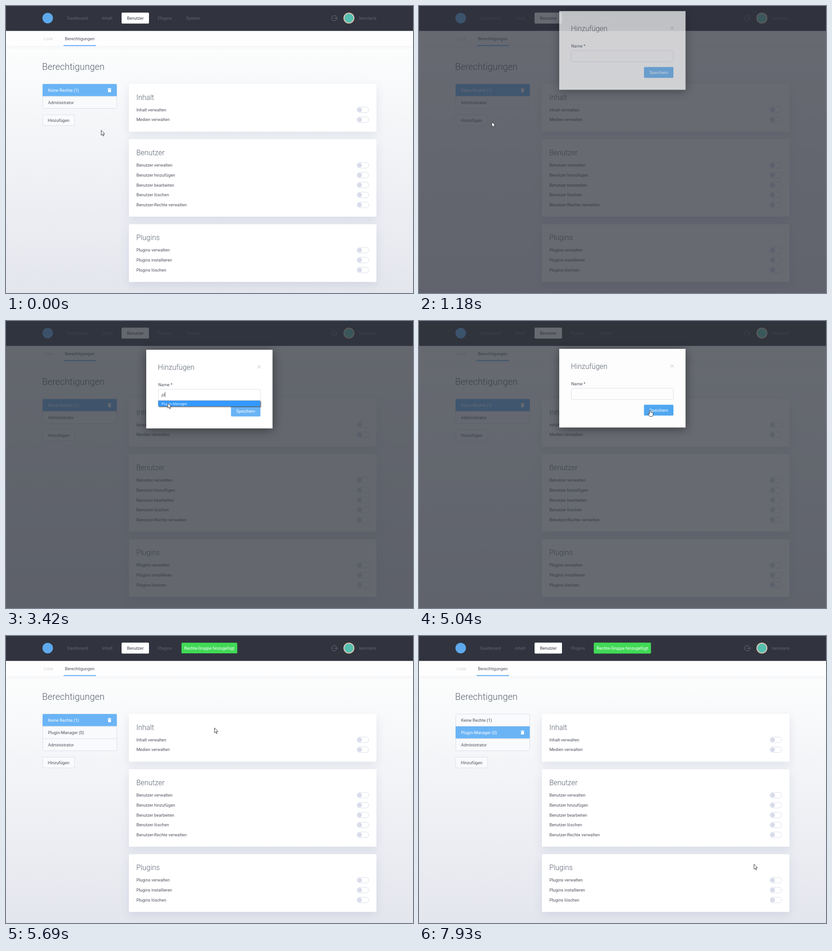
Animation, 891 px wide and 629 px high, one loop 7.99 s. Source, as an HTML page with a canvas:

```html
<!DOCTYPE html>
<html lang="de">
<head>
<meta charset="utf-8">
<title>Berechtigungen</title>
<style>
html, body { margin: 0; width: 100%; height: 100%; overflow: hidden; background: #fff; }
canvas { display: block; }
</style>
</head>
<body>
<canvas id="stage" width="891" height="629"></canvas>
<script>
const W = 891, H = 629, LOOP = 7990;
const screen2d = document.getElementById('stage').getContext('2d');
const layer = document.createElement('canvas');
layer.width = W;
layer.height = H;
const layer2d = layer.getContext('2d');
let ctx = screen2d;

const BLUE = '#6ab4f5', INK = '#50545f', HEAD = '#5c6472', LINE = '#dadeea';

const OPEN = 979, CLOSE = 5030, SLIDE = 490, FADE = 315;
const SAVED = 5450, SELECT = 6590;
const SUGGEST = 2940, TYPE_L = 3170, PICK = 3730;

const clamp = v => Math.max(0, Math.min(1, v));

// CSS "ease": cubic-bezier(.25, .1, .25, 1)
function ease(x) {
  if (x <= 0) return 0;
  if (x >= 1) return 1;
  let lo = 0, hi = 1, u = 0.5;
  for (let i = 0; i < 24; i++) {
    u = (lo + hi) / 2;
    const bx = 0.75 * u * (1 - u) + u * u * u;
    if (bx < x) lo = u; else hi = u;
  }
  return 0.3 * u * (1 - u) ** 2 + 3 * u * u * (1 - u) + u ** 3;
}

function box(x, y, w, h, r, fill, stroke) {
  ctx.beginPath();
  ctx.roundRect(x, y, w, h, r);
  if (fill) { ctx.fillStyle = fill; ctx.fill(); }
  if (stroke) { ctx.strokeStyle = stroke; ctx.lineWidth = 1; ctx.stroke(); }
}

function disc(x, y, r, fill) {
  ctx.beginPath();
  ctx.arc(x, y, r, 0, 7);
  ctx.fillStyle = fill;
  ctx.fill();
}

function path(points, stroke, width = 1) {
  ctx.beginPath();
  points.forEach(([x, y], i) => i ? ctx.lineTo(x, y) : ctx.moveTo(x, y));
  ctx.strokeStyle = stroke;
  ctx.lineWidth = width;
  ctx.stroke();
}

// y is the middle of the line
function text(str, x, y, color = INK, align = 'left') {
  ctx.font = '400 9.3px Roboto, sans-serif';
  ctx.fillStyle = color;
  ctx.textAlign = align;
  ctx.fillText(str, x, y + 3.4);
}

function heading(str, x, base, size) {
  ctx.font = `300 ${size}px Roboto, sans-serif`;
  ctx.fillStyle = HEAD;
  ctx.textAlign = 'left';
  ctx.fillText(str, x, base);
}

function shadow(color, blur, dy) {
  ctx.shadowColor = color;
  ctx.shadowBlur = blur;
  ctx.shadowOffsetY = dy;
}

function header() {
  ctx.fillStyle = '#31343e';
  ctx.fillRect(0, 0, W, 54.6);
  disc(91.3, 26.5, 11.5, '#5ea9ec');
  box(253, 14.5, 60, 24, 2, '#fff');
  const dim = '#62656f';
  text('Dashboard', 134, 26.5, dim);
  text('Inhalt', 210, 26.5, dim);
  text('Benutzer', 264.8, 26.5, '#3a3e49');
  text('Plugins', 332.6, 26.5, dim);
  text('System', 394.3, 26.5, dim);

  ctx.beginPath();
  ctx.arc(718.6, 26.8, 5.8, 0.6, Math.PI * 2 - 0.6);
  ctx.strokeStyle = '#747781';
  ctx.lineWidth = 1;
  ctx.stroke();
  path([[718, 26.8], [725.5, 26.8]], '#747781');
  path([[723.2, 24.5], [725.6, 26.8], [723.2, 29.1]], '#747781');

  disc(750.7, 26.5, 12, '#d9c5b2');
  disc(750.7, 26.5, 9.8, '#55bfb0');
  text('benolaris', 811, 26.5, dim, 'right');
}

function subnav() {
  shadow('rgba(70,80,130,.06)', 8, 2);
  ctx.fillStyle = '#fefefe';
  ctx.fillRect(0, 54.6, W, 33);
  shadow('transparent', 0, 0);
  text('Liste', 82.7, 71.5, '#cdd0d8');
  text('Berechtigungen', 129, 71.5, INK);
  ctx.fillStyle = '#5fadf3';
  ctx.fillRect(126, 85.7, 71, 2);
}

function trash(x, y) {
  ctx.fillStyle = '#fff';
  ctx.fillRect(x - 4, y - 3.6, 8, 1.3);
  ctx.fillRect(x - 1.5, y - 4.6, 3, 1.2);
  box(x - 3.2, y - 1.8, 6.4, 6.4, 0.8, '#fff');
}

function list(t) {
  const rows = ['Keine Rechte (1)', 'Administrator'];
  if (t >= SAVED) rows.splice(1, 0, 'Plugin-Manager (0)');
  const active = t >= SELECT ? 1 : 0;
  const h = rows.length * 27;
  box(80.5, 171, 162, h - 0.5, 2, '#f9fafc', LINE);
  rows.forEach((label, i) => {
    const y = 171 + i * 27;
    if (i > 0) path([[80.5, y], [242.5, y]], LINE);
    if (i === active) {
      box(80, y, 162.5, 26.8, i ? 0 : [2, 2, 0, 0], BLUE);
      trash(226.6, y + 13.3);
    }
    text(label, 92, y + 13.4, i === active ? '#fff' : INK);
  });
  const top = 184.5 + h;
  box(80.5, top, 69.5, 23.5, 2, '#f9fafc', LINE);
  text('Hinzufügen', 91.5, top + 12, INK);
}

function card(y, h, title, rows) {
  shadow('rgba(80,92,150,.13)', 20, 7);
  box(269, y, 542, h, 2, '#fff');
  shadow('transparent', 0, 0);
  heading(title, 285.2, y + 35, 15.95);
  rows.forEach((label, i) => {
    const cy = y + 56.8 + i * 21.7;
    text(label, 285.4, cy);
    box(768.5, cy - 6, 25.7, 12.4, 6.2, '#fff', LINE);
    disc(774.2, cy + 0.2, 5, '#d8dcea');
  });
}

function page(t) {
  const g = ctx.createLinearGradient(0, 88, 0, H);
  g.addColorStop(0, '#fcfdfd');
  g.addColorStop(1, '#e4e6ed');
  ctx.fillStyle = g;
  ctx.fillRect(0, 0, W, H);
  subnav();
  header();
  heading('Berechtigungen', 79, 139.6, 19.93);
  list(t);
  card(170.5, 105, 'Inhalt', ['Inhalt verwalten', 'Medien verwalten']);
  card(292, 169.7, 'Benutzer', ['Benutzer verwalten', 'Benutzer hinzufügen',
    'Benutzer bearbeiten', 'Benutzer löschen', 'Benutzer-Rechte verwalten']);
  card(478.2, 126.5, 'Plugins', ['Plugins verwalten', 'Plugins installieren', 'Plugins löschen']);
}

function backdrop(t) {
  const dark = ease((t - 935) / FADE) - ease((t - CLOSE) / FADE);
  ctx.fillStyle = `rgba(49,52,62,${0.75 * dark})`;
  ctx.fillRect(0, 0, W, H);
}

function entry(t) {
  if (t < SUGGEST || t >= CLOSE) return '';
  return t < TYPE_L ? 'p' : t < PICK ? 'pl' : 'Plugin-Manager';
}

function suggestion(y, hot) {
  ctx.fillStyle = 'rgba(40,40,40,.55)';
  ctx.fillRect(335, y + 2, 223.6, 12.5);
  ctx.fillStyle = hot ? '#3399ff' : '#fff';
  ctx.fillRect(333, y, 224, 12.6);
  ctx.strokeStyle = '#7d8794';
  ctx.lineWidth = 0.6;
  ctx.strokeRect(333.3, y + 0.3, 223.4, 12.2);
  ctx.font = '400 7.75px "Open Sans", "Noto Sans", sans-serif';
  ctx.fillStyle = hot ? '#fff' : '#222';
  ctx.textAlign = 'left';
  ctx.fillText('Plugin-Manager', 340.3, y + 9.2);
}

function dialog(t, y, pos) {
  shadow('rgba(0,0,0,.42)', 20, 4);
  ctx.fillStyle = '#fff';
  ctx.fillRect(307, y, 276.5, 172.4);
  shadow('transparent', 0, 0);
  heading('Hinzufügen', 332.6, y + 44, 15.95);
  path([[550.6, y + 34.2], [557.4, y + 41]], '#b4b8c2');
  path([[557.4, y + 34.2], [550.6, y + 41]], '#b4b8c2');
  text('Name *', 333.2, y + 76.2, '#4d5261');
  box(333.5, y + 86.5, 223.3, 24.6, 2, '#fff', '#dfe2ea');

  const value = entry(t);
  text(value, 340.5, y + 98.4);
  if (t >= SUGGEST && t < CLOSE && !(t >= 4260 && t < 4790)) {
    const cx = 340.8 + ctx.measureText(value).width;
    path([[cx, y + 92.5], [cx, y + 104]], '#444', 0.8);
  }

  const hover = pos.y < y + 146.2 && overSave(pos);
  box(492.5, y + 122.6, 64.5, 23.6, 2, hover ? '#50a8f3' : BLUE);
  text('Speichern', 524.8, y + 134.4, '#fff', 'center');
  if (t >= SUGGEST && t < PICK) suggestion(y + 111.5, pos.y > 174.5);
}

// drawn on its own layer, so that the whole dialog fades as one
function modal(t, pos) {
  const shown = ease((t - OPEN) / SLIDE) - ease((t - CLOSE) / SLIDE);
  if (shown <= 0) return;
  ctx = layer2d;
  ctx.clearRect(0, 0, W, H);
  dialog(t, 63 - 172.4 * (1 - shown), pos);
  ctx = screen2d;
  ctx.globalAlpha = shown;
  ctx.drawImage(layer, 0, 0);
  ctx.globalAlpha = 1;
}

function toast(t) {
  const p = clamp((t - SAVED) / 480);
  if (!p) return;
  const s = 1 - 0.4 * (1 - p) ** 4;
  ctx.save();
  ctx.globalAlpha = clamp((t - SAVED) / 150);
  ctx.translate(445.2, 26.4);
  ctx.scale(s, s);
  box(-62.6, -12, 125.2, 24, 2, '#41d956');
  text('Rechte-Gruppe hinzugefügt', 0, 0, '#fff', 'center');
  ctx.restore();
}

// time, x, y of the pointer tip
const TRACK = [
  [0, 208.5, 272.3], [310, 208.5, 272.3], [690, 139, 254], [1070, 139, 254],
  [1180, 159, 254.3], [1690, 313, 174], [1730, 313, 174], [1870, 328, 174],
  [1980, 328, 174], [2090, 343.5, 172.5], [3150, 343.5, 172.5], [3400, 354.3, 180],
  [3760, 354.3, 180], [4490, 478, 191], [4530, 478, 191], [4790, 506, 195],
  [5560, 505.5, 195], [5690, 457.3, 201.2], [6210, 210, 215.5], [6930, 210, 215.5],
  [7760, 698, 475], [7800, 698, 475], [7920, 733.3, 500], [LOOP, 733.3, 500]
];

function pointer(t) {
  const i = Math.max(1, TRACK.findIndex(k => k[0] > t));
  const [t0, x0, y0] = TRACK[i - 1], [t1, x1, y1] = TRACK[i];
  const u = (t - t0) / (t1 - t0);
  const rolling = t0 === 1070 || t0 === 5560;
  const leaving = t0 === 1180 || t0 === 5690;
  const s = rolling ? u * u : leaving ? 1 - (1 - u) ** 2 : u * u * (3 - 2 * u);
  return { x: x0 + (x1 - x0) * s, y: y0 + (y1 - y0) * s };
}

const inside = (p, x, y, w, h) => p.x >= x && p.x <= x + w && p.y >= y && p.y <= y + h;
const overSave = p => inside(p, 492.5, 185.6, 64.5, 24);

function shape(t, p) {
  if (t > OPEN && t < CLOSE + 100) {
    if (overSave(p)) return 'hand';
    return t < PICK && inside(p, 333.5, 149, 224, 25) && t > 1500 ? 'beam' : 'arrow';
  }
  const rows = inside(p, 80, 171, 162.5, t < SAVED ? 54 : 81);
  return rows || (t < OPEN && inside(p, 80, 238, 70, 24)) ? 'hand' : 'arrow';
}

function cursor(t, p) {
  const kind = shape(t, p);
  ctx.save();
  ctx.translate(p.x, p.y);
  ctx.lineJoin = 'round';
  if (kind === 'beam') {
    path([[-2.5, -6], [-0.5, -5.5], [0, -5], [0, 5], [-0.5, 5.5], [-2.5, 6]], '#222', 0.9);
    path([[2.5, -6], [0.5, -5.5], [0, -5]], '#222', 0.9);
    path([[2.5, 6], [0.5, 5.5], [0, 5]], '#222', 0.9);
  } else {
    const outline = new Path2D(kind === 'hand'
      ? 'M-1.2 1Q0 -.6 1.2 1V5Q2.4 4.2 3.3 5.4Q4.6 4.8 5.2 6Q6.6 5.8 6.6 7.2V10Q6.4 12 5.2 14.2H-.8L-4.2 9.2Q-4.6 7.4-3 7.8L-1.2 9.3Z'
      : 'M0 0V11L2.5 8.7L4.1 12.6L5.9 11.9L4.3 8.1H7.7Z');
    ctx.fillStyle = '#fff';
    ctx.fill(outline);
    ctx.strokeStyle = '#1c1c20';
    ctx.lineWidth = 0.85;
    ctx.stroke(outline);
  }
  ctx.restore();
}

function draw() {
  const t = performance.now() % LOOP;
  const p = pointer(t);
  page(t);
  backdrop(t);
  modal(t, p);
  toast(t);
  cursor(t, p);
  requestAnimationFrame(draw);
}
draw();
</script>
</body>
</html>
```
